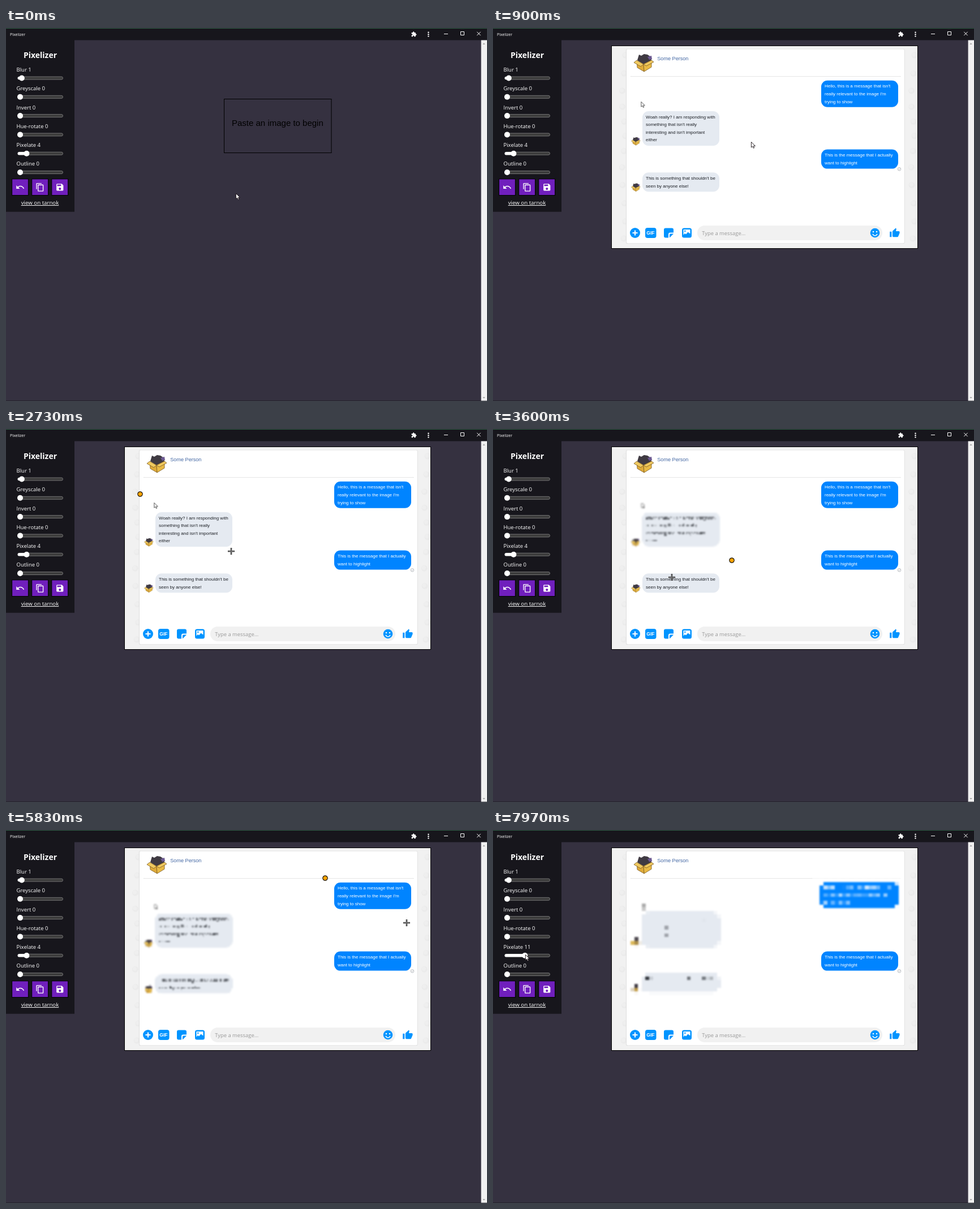
Animation, 850 px wide and 659 px high, one loop 8 s. Source, as an HTML page with a canvas:

```html
<!DOCTYPE html>
<html lang="en">
<head>
<meta charset="utf-8">
<title>Pixelizer</title>
<style>
html, body { margin: 0; width: 100%; height: 100%; overflow: hidden; background: #353140; }
#stage { position: relative; width: 850px; height: 659px; overflow: hidden; }
svg { position: absolute; left: 0; top: 0; display: block; }
canvas { position: absolute; left: 210px; top: 32px; display: block; }
text { font-family: "Open Sans", "Noto Sans", sans-serif; fill: #fff; }
</style>
</head>
<body>
<div id="stage">
<svg width="850" height="659" viewBox="0 0 850 659">
  <rect width="850" height="659" fill="#353140"/>
  <rect width="850" height="21.5" fill="#17161c"/>
  <rect width="850" height="1" fill="#2f5c44"/>
  <text x="7" y="13.7" font-size="7">Pixelizer</text>
  <g fill="#fff">
    <path transform="translate(715.7 5.8) scale(.43)" d="M20.5 11H19V7c0-1.1-.9-2-2-2h-4V3.5C13 2.12 11.88 1 10.5 1S8 2.12 8 3.5V5H4c-1.1 0-2 .9-2 2v3.8h1.5c1.5 0 2.7 1.2 2.7 2.7s-1.2 2.7-2.7 2.7H2V20c0 1.1.9 2 2 2h3.8v-1.5c0-1.5 1.2-2.7 2.7-2.7s2.7 1.2 2.7 2.7V22H17c1.1 0 2-.9 2-2v-4h1.5c1.4 0 2.5-1.1 2.5-2.5S21.9 11 20.5 11z"/>
    <circle cx="746.5" cy="7.8" r="1.2"/><circle cx="746.5" cy="11.2" r="1.2"/><circle cx="746.5" cy="14.6" r="1.2"/>
  </g>
  <path d="M774 10.5h7M803.5 6.5h6v6h-6zM832.3 6.8l6.4 6.4M838.7 6.8l-6.4 6.4" fill="none" stroke="#fff"/>
  <rect y="658" width="850" height="1" fill="#24222c"/>
  <rect x="839.6" y="21.5" width="10.4" height="637" fill="#f1f1f1"/>
  <path d="M842.3 29l2.3-2.6 2.3 2.6zM842.3 652l2.3 2.6 2.3-2.6z" fill="#a3a3a3"/>

  <rect y="21" width="121" height="303.7" fill="#17161c"/>
  <text x="60.5" y="52.6" font-size="14" font-weight="700" text-anchor="middle">Pixelizer</text>
  <g id="sliders"></g>
  <g id="buttons"></g>
  <text x="60" y="312" font-size="9.7" text-anchor="middle" text-decoration="underline">view on tarnok</text>

  <g id="paste">
    <rect x="385.5" y="125.5" width="189.5" height="95" fill="none" stroke="#000"/>
    <text x="399" y="173.4" font-size="15" style="font-family:'Liberation Sans',Arial,sans-serif;fill:#000">Paste an image to begin</text>
  </g>
  <rect id="frame" x="209.5" y="31.5" width="541" height="358" fill="#f1f1f1" stroke="#000"/>
</svg>
<canvas id="view" width="540" height="357"></canvas>
<svg width="850" height="659" viewBox="0 0 850 659">
  <circle id="dot" r="4.2" fill="#ffa500" stroke="#1a1408" stroke-width="1.2"/>
  <g id="cross" fill="none">
    <path d="M-6 0H6M0-6V6" stroke="#333" stroke-width="2.6"/>
    <path d="M-5.3 0H5.3M0-5.3V5.3" stroke="#8d8d8d" stroke-width=".9"/>
  </g>
  <path id="arrow" fill="#fff" stroke="#1c1418" stroke-width=".9" stroke-linejoin="round"/>
</svg>
</div>
<script>
const LOOP = 8000, W = 540, H = 357, OX = 210, OY = 32;
const SCALE = 0.605, BLUR = 1.7;
const SHIFT = 0.18; // sampling offset below the block centre, in blocks
const ARROW = 'M.4 .4V10L2.6 8 4.2 11.3 5.8 10.6 4.3 7.4H7.4Z';
const $ = id => document.getElementById(id);

// Sidebar
const ICONS = [
  'M12.5 8c-2.65 0-5.05.99-6.9 2.6L2 7v9h9l-3.62-3.62c1.39-1.16 3.16-1.88 5.12-1.88 3.54 0 6.55 2.31 7.6 5.5l2.37-.78C21.08 11.03 17.15 8 12.5 8z',
  'M16 1H4c-1.1 0-2 .9-2 2v14h2V3h12V1zm3 4H8c-1.1 0-2 .9-2 2v14c0 1.1.9 2 2 2h11c1.1 0 2-.9 2-2V7c0-1.1-.9-2-2-2zm0 16H8V7h11v14z',
  'M17 3H5c-1.1 0-2 .9-2 2v14c0 1.1.9 2 2 2h14c1.1 0 2-.9 2-2V7l-4-4zm-5 16c-1.7 0-3-1.3-3-3s1.3-3 3-3 3 1.3 3 3-1.3 3-3 3zm3-10H5V5h10v4z'
];
const thumbX = v => 25 + 2.85 * v;

$('sliders').innerHTML = [['Blur', 1], ['Greyscale', 0], ['Invert', 0], ['Hue-rotate', 0], ['Pixelate', 4], ['Outline', 0]]
  .map(([name, v], i) => {
    const y = 88.5 + i * 33.3, x = thumbX(v);
    return `<g id="${name}"><text x="18.5" y="${y - 11.6}" font-size="9.5">${name} ${v}</text>
      <rect x="21" y="${y - 2.5}" width="79.5" height="5" rx="2.5" fill="#3b3b3b" stroke="#858585" stroke-width=".8"/>
      <rect class="fill" x="20.6" y="${y - 2.6}" width="${x - 20.6}" height="5.2" rx="2.6" fill="#fff"/>
      <circle cx="${x}" cy="${y}" r="5" fill="#fff"/></g>`;
  }).join('');

$('buttons').innerHTML = ICONS.map((d, i) => {
  const x = 11 + i * 35.1;
  return `<rect x="${x - .4}" y="266.8" width="28.8" height="28.8" fill="#701fbd" stroke="#000"/>
    <path transform="translate(${x + 5.9} 273.2) scale(.68)" fill="#fff" d="${d}"/>`;
}).join('');

function setPixelate(v) {
  const g = $('Pixelate'), x = thumbX(v);
  g.querySelector('text').textContent = 'Pixelate ' + v;
  g.querySelector('.fill').setAttribute('width', x - 20.6);
  g.querySelector('circle').setAttribute('cx', x);
}

// Pasted chat picture
function makeCanvas(w, h) {
  const c = document.createElement('canvas');
  c.width = w;
  c.height = h;
  return c;
}

function drawChat() {
  const pic = makeCanvas(W, H), c = pic.getContext('2d');
  const ARIAL = '"Liberation Sans", Arial, sans-serif', SANS = '"Open Sans", "Noto Sans", sans-serif';
  const BLUE = '#0084ff', ICON = '#0094ff';
  c.translate(-OX, -OY);

  const box = (x, y, w, h, r, fill) => {
    c.fillStyle = fill;
    c.beginPath();
    c.roundRect(x, y, w, h, r);
    c.fill();
  };
  const disc = (x, y, r, fill) => box(x - r, y - r, 2 * r, 2 * r, r, fill);
  const write = (s, x, y, font, fill) => {
    c.font = font;
    c.fillStyle = fill;
    c.fillText(s, x, y);
  };
  const shape = (d, fill, x = 0, y = 0, k = 1, stroke, lw = 1) => {
    c.save();
    c.translate(x, y);
    c.scale(k, k);
    const p = new Path2D(d);
    if (fill) { c.fillStyle = fill; c.fill(p); }
    if (stroke) { c.strokeStyle = stroke; c.lineWidth = lw; c.stroke(p); }
    c.restore();
  };
  const bubble = (x, y, h, fill, ink, lines) => {
    box(x, y, 136, h, 11, fill);
    lines.forEach((s, i) => write(s, x + 6, y + 12.6 + i * 13.6, '8px ' + ARIAL, ink));
  };
  const avatar = (x, y, k) => {
    const edge = '#7a5a24';
    shape('M6 14L9 4 13 6 18 3 24 4 30 8 31 14 17 21Z', '#3f3a42', x, y, k);
    shape('M24 8L31 6 32 12 27 13Z', '#6b5890', x, y, k);
    shape('M5 15L17 21 18 34 6 27Z', '#dfab3a', x, y, k, edge, .8);
    shape('M17 21L31 14V26L18 34Z', '#e9ba45', x, y, k, edge, .8);
    shape('M5 14L17 21 12 25 0 18Z', '#f0ca60', x, y, k, edge, .8);
    shape('M17 21L31 14 35 17 22 24Z', '#f0ca60', x, y, k, edge, .8);
  };

  box(OX, OY, W, H, 0, '#f1f1f1');
  for (let i = 0; i < 12; i++) {
    const y = 48 + i * 29 + 5 * Math.sin(i * 7);
    for (const x of [231, 742]) {
      disc(x + 3 * Math.cos(i * 5), y, 5.5, '#ebebeb');
      disc(x + 3 * Math.cos(i * 5) - 1, y - 1, 3.5, '#efefef');
    }
  }
  box(235, 37, 492.5, 344, 2, '#dedede');
  box(236, 37.5, 490.8, 342.8, 2, '#fff');
  c.fillStyle = '#dcdcdc';
  for (let x = 243; x < 720; x += 2) c.fillRect(x, 85, 1.5, 1);

  avatar(249, 43, 1);
  write('Some Person', 290.3, 57.4, '9.1px ' + ARIAL, '#4468a4');

  bubble(580, 92.7, 47, BLUE, '#fff', ["Hello, this is a message that isn't", "really relevant to the image I'm", 'trying to show']);
  bubble(264, 147, 61, '#e5eaf1', '#1d2026', ['Woah really? I am responding with', "something that isn't really", "interesting and isn't important", 'either']);
  bubble(580, 214.6, 34, BLUE, '#fff', ['This is the message that I actually', 'want to highlight']);
  bubble(264, 255.3, 34, '#e5eaf1', '#1d2026', ["This is something that shouldn't be", 'seen by anyone else!']);
  avatar(244.3, 191.5, .46);
  avatar(244.3, 273, .46);
  shape('M-2.8 0a2.8 2.8 0 1 0 5.6 0a2.8 2.8 0 1 0 -5.6 0M-1.3 0L-.3 1 1.4-1', null, 718, 249.3, 1, '#a9adb3', .8);
  shape(ARROW, '#fff', 261.5, 130, .92, '#333', .9);

  // Composer
  disc(251, 362, 9, ICON);
  shape('M-4.5 0H4.5M0-4.5V4.5', null, 251, 362, 1, '#fff', 2);
  box(269, 353, 19.5, 18, 4, ICON);
  write('GIF', 271.2, 365.4, 'bold 8.6px ' + ARIAL, '#fff');
  shape('M3 0H14Q17 0 17 3V8H11Q8 8 8 11V17H3Q0 17 0 14V3Q0 0 3 0ZM10 17V12Q10 10 12 10H17Z', ICON, 302, 353.5);
  box(334, 353.5, 17, 17, 3.5, ICON);
  shape('M2.5 2.5H14.5V10L10.5 7 7 11 5 9.5 2.5 12Z', '#fff', 334, 353.5);
  disc(339.3, 358.7, 1.3, ICON);
  box(361, 349, 327, 26, 13, '#f1f1f1');
  write('Type a message...', 369.3, 365.8, '9.4px ' + SANS, '#999');
  disc(675, 362, 8.3, ICON);
  disc(672, 360, 1.3, '#fff');
  disc(678, 360, 1.3, '#fff');
  shape('M-4.2 2Q0 8 4.2 2', null, 675, 362, 1, '#fff', 1.5);
  shape('M1 21h4V9H1v12zm22-11c0-1.1-.9-2-2-2h-6.3l.95-4.57.03-.32c0-.41-.17-.79-.44-1.06L14.2 1 7.6 7.6C7.2 8 7 8.5 7 9v10c0 1.1.9 2 2 2h9c.8 0 1.5-.5 1.8-1.2l3-7.05c.1-.2.2-.5.2-.75v-2z', ICON, 700.4, 352.6, .79);
  return pic;
}

// Selections: box, start corner, drag start and end
const AREAS = [
  { x: 236.6, y: 116.2, w: 186, h: 116, dot: [237, 115], from: 2300, to: 3100 },
  { x: 236.2, y: 232, w: 186, h: 73, dot: [422, 232], from: 3130, to: 4470 },
  { x: 564, y: 85, w: 159, h: 77, dot: [564, 85], from: 5300, to: 6330 }
];
const pic = drawChat(), view = $('view').getContext('2d');

function pixelate({ x, y, w, h }, level) {
  const p = level * SCALE, cols = Math.ceil(w / p), rows = Math.ceil(h / p);
  const small = makeCanvas(cols, rows), s = small.getContext('2d');
  x -= OX;
  y -= OY;
  s.imageSmoothingEnabled = false;
  s.drawImage(pic, x, y + SHIFT * p, cols * p, rows * p, 0, 0, cols, rows);
  view.save();
  view.beginPath();
  view.rect(x, y, w, h);
  view.clip();
  view.imageSmoothingEnabled = false;
  view.filter = `blur(${BLUR}px)`;
  view.drawImage(small, x, y, cols * p, rows * p);
  view.restore();
}

// Pointer path: time, x, y
const PATH = [
  [0, 406, 292], [250, 406, 292], [570, 456, 201], [1140, 456, 201], [1970, 238, 117], [2100, 237, 115],
  [2270, 237, 115], [2730, 398, 216], [3100, 422, 232], [3130, 422, 232], [3930, 240, 291], [4080, 233, 300],
  [4160, 236, 308], [4230, 238, 305], [4450, 238, 305], [5000, 608, 77], [5230, 564, 85], [5280, 564, 85],
  [5830, 708, 164], [5970, 723, 163], [6110, 723, 163], [6170, 727, 162], [6310, 727, 162], [6870, 65, 179],
  [7030, 31, 242], [7130, 36, 222], [7170, 36, 222], [7970, 57, 220], [8000, 57, 220]
];

const slope = (i, k) => (PATH[i + 1][k] - PATH[i][k]) / (PATH[i + 1][0] - PATH[i][0]);
function tangent(i, k) {
  if (i === 0 || i === PATH.length - 1) return 0;
  const a = slope(i - 1, k), b = slope(i, k);
  return a * b > 0 ? 2 * a * b / (a + b) : 0;
}
function pointer(t) {
  let i = 0;
  while (i < PATH.length - 2 && t >= PATH[i + 1][0]) i++;
  const d = PATH[i + 1][0] - PATH[i][0], u = (t - PATH[i][0]) / d, v = 1 - u;
  return [1, 2].map(k => v * v * (1 + 2 * u) * PATH[i][k] + u * u * (3 - 2 * u) * PATH[i + 1][k]
    + d * u * v * (v * tangent(i, k) - u * tangent(i + 1, k)));
}

const show = (el, on) => el.setAttribute('visibility', on ? 'visible' : 'hidden');
const move = (el, x, y) => el.setAttribute('transform', `translate(${x} ${y})`);
$('arrow').setAttribute('d', ARROW);
let state = '';

function render(t) {
  const [x, y] = pointer(t).map(Math.round);
  const drag = AREAS.find(a => t >= a.from && t < a.to);
  const done = AREAS.filter(a => t >= a.to);
  const pasted = t >= 900;
  const level = t < 7170 ? 4 : 4 + Math.round((x - 36) / 3);

  show($('paste'), !pasted);
  show($('frame'), pasted);
  $('view').style.visibility = pasted ? 'visible' : 'hidden';
  show($('dot'), drag);
  show($('cross'), drag);
  show($('arrow'), !drag);
  if (drag) move($('dot'), ...drag.dot);
  move($('cross'), x, y);
  move($('arrow'), x, y);

  const next = done.length + ':' + level;
  if (next === state) return;
  state = next;
  setPixelate(level);
  view.drawImage(pic, 0, 0);
  done.forEach(a => pixelate(a, level));
}

function tick() {
  render(performance.now() % LOOP);
  requestAnimationFrame(tick);
}
tick();
</script>
</body>
</html>
```
